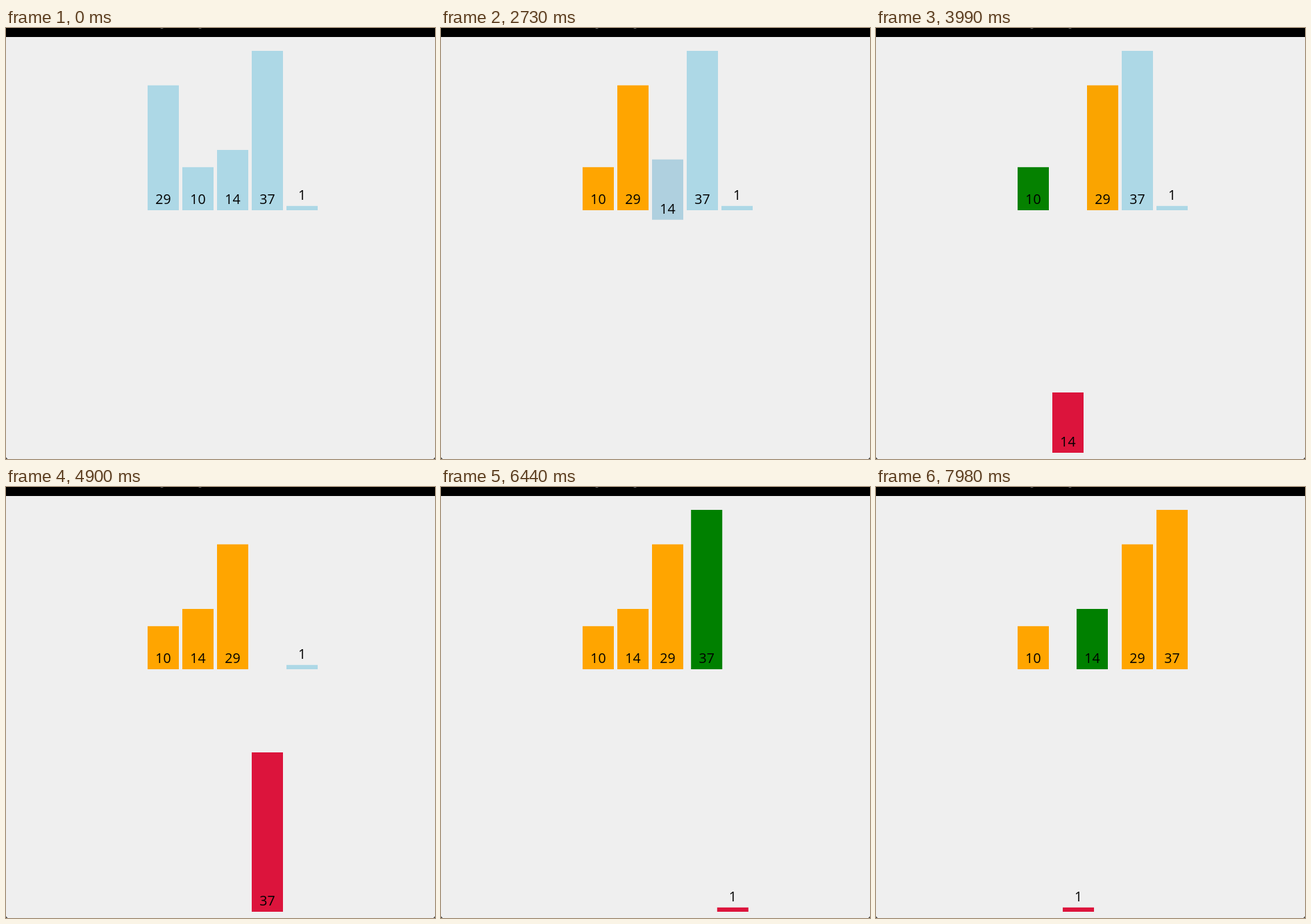
Animation of 618x622 px, one loop 8000 ms. Source, as an HTML page:

```html
<!DOCTYPE html>
<html lang="en">
<head>
<meta charset="utf-8">
<title>Insertion sort</title>
<style>
  html, body { margin: 0; width: 100%; height: 100%; overflow: hidden; background: #efefef; }
  svg { display: block; width: 618px; height: 622px; }
  text { font: 19.5px "Open Sans", "Noto Sans", sans-serif; text-anchor: middle; }
</style>
</head>
<body>
<svg viewBox="0 0 618 622">
  <rect width="618" height="622" fill="#efefef"/>
  <rect width="618" height="13"/>
  <path d="M220 -1Q224.500 1.500 229 -1M275 -1Q279.500 1.500 284 -1" fill="none" stroke="#bbb"/>
  <path d="M0 619.500V622H2.500ZM618 619.500V622H615.500Z" fill="#444"/>
  <g id="bars"></g>
</svg>
<script>
const LOOP = 8000, TICK = 70;
const START = 834, STEP = 368.5, FADE = 250;
const LEFT = 204, PITCH = 50, WIDTH = 45, BASE = 263, DROP = 350, UNIT = 230 / 37;
const BLUE = [173, 216, 230], ORANGE = [255, 165, 0], RED = [220, 20, 60], GREEN = [0, 128, 0];
const values = [29, 10, 14, 37, 1];

// Every step of the sort, as a snapshot of all bars.
function sortSteps() {
  const bars = values.map((value, slot) => ({ value, slot, low: 0, fill: BLUE }));
  const order = bars.slice();
  const steps = [];
  const save = () => steps.push(bars.map(b => ({ ...b })));
  save();
  order[0].fill = ORANGE;
  save();
  for (let i = 1; i < order.length; i++) {
    const key = order[i];
    key.low = 1;
    key.fill = RED;
    save();
    let j = i - 1;
    while (j >= 0) {
      const other = order[j];
      other.fill = GREEN;
      save();
      if (other.value <= key.value) {
        other.fill = ORANGE;
        break;
      }
      order[j + 1] = other;
      order[j] = key;
      other.slot = j + 1;
      key.slot = j;
      save();
      other.fill = ORANGE;
      j--;
    }
    key.low = 0;
    key.fill = ORANGE;
    save();
  }
  return steps;
}

function add(name, attrs, parent) {
  const el = document.createElementNS("http://www.w3.org/2000/svg", name);
  for (const key in attrs) el.setAttribute(key, attrs[key]);
  return parent.appendChild(el);
}

const clamp = (v, lo, hi) => Math.min(hi, Math.max(lo, v));
const mix = (a, b, p) => a + (b - a) * p;
const ease = p => p < 0.5 ? 4 * p ** 3 : 1 - 4 * (1 - p) ** 3;

const steps = sortSteps();
const root = document.getElementById("bars");
const nodes = values.map(value => {
  const h = value * UNIT;
  const g = add("g", {}, root);
  const rect = add("rect", { y: BASE - h, width: WIDTH, height: h }, g);
  const y = value === 1 ? BASE - h - 9 : BASE - 9;
  add("text", { x: WIDTH / 2, y }, g).textContent = value;
  return { g, rect };
});

function draw(time) {
  const since = time - START;
  const k = clamp(Math.floor(since / STEP), 0, steps.length - 2);
  const p = ease(clamp((since - k * STEP) / FADE, 0, 1));
  nodes.forEach(({ g, rect }, i) => {
    const a = steps[k][i], b = steps[k + 1][i];
    const x = LEFT + PITCH * mix(a.slot, b.slot, p);
    const y = DROP * mix(a.low, b.low, p);
    const rgb = a.fill.map((c, n) => Math.round(mix(c, b.fill[n], p)));
    g.setAttribute("transform", `translate(${x} ${y})`);
    rect.setAttribute("fill", `rgb(${rgb})`);
  });
}

function frame() {
  const t = performance.now() % LOOP;
  draw(Math.floor(t / TICK) * TICK);
  requestAnimationFrame(frame);
}
frame();
</script>
</body>
</html>
```
